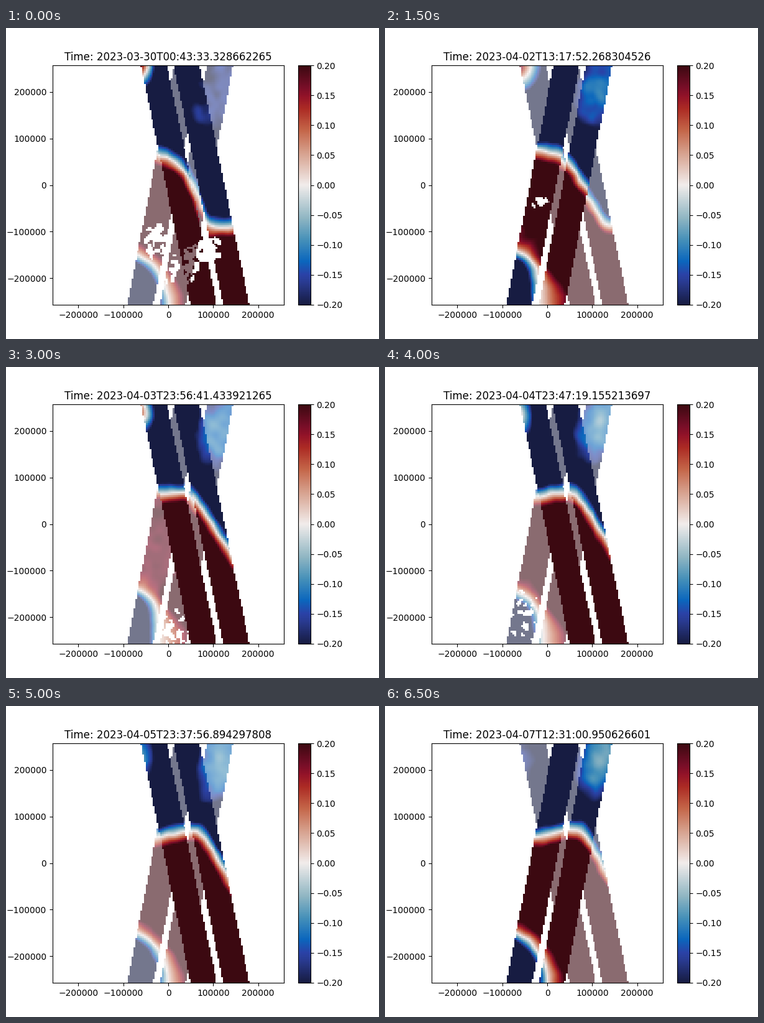
Write a matplotlib script that moves like this. It is 600 px wide and 500 px high and loops after 7000 ms.

```python
import numpy as np
import matplotlib.pyplot as plt
from matplotlib.animation import FuncAnimation
from matplotlib.colors import LinearSegmentedColormap

N = 129          # grid cells per side, about 4 km each
HALF = 257000
LIMIT = 0.2
FRAMES = 14

TIMES = [
    "2023-03-30T00:43:33.328662265", "2023-04-01T13:27:14.531207113",
    "2023-04-02T00:15:25.922013697", "2023-04-02T13:17:52.268304526",
    "2023-04-03T00:06:03.705673898", "2023-04-03T13:08:30.004416283",
    "2023-04-03T23:56:41.433921265", "2023-04-04T12:59:07.741052490",
    "2023-04-04T23:47:19.155213697", "2023-04-05T12:49:45.476731808",
    "2023-04-05T23:37:56.894297808", "2023-04-06T12:40:23.213507675",
    "2023-04-06T23:28:34.632810416", "2023-04-07T12:31:00.950626601",
]

STOPS = {
    0: "#171c42", .09: "#293a8f", .125: "#2a42a7", .18: "#0b66bd",
    .27: "#4590b9", .36: "#8eb5c2", .5: "#f1eceb", .64: "#d59d89",
    .73: "#c46548", .82: "#ac2b24", .87: "#941328", .91: "#780e28",
    1: "#3c0911",
}
cmap = LinearSegmentedColormap.from_list("diverging", list(STOPS.items()))

# Cell centres in stage pixels
cell = (np.arange(N) + .5) / N
X, Y = np.meshgrid(75 + 372 * cell, 60 + 385 * cell)

# Missing data per pass: centre, radii, density
GAPS = {
    -1: [(242, 340, 24, 34, 2.4), (266, 385, 13, 40, 1.6)],
    0: [(325, 358, 28, 26, 3), (298, 378, 15, 36, 2.6)],
    3: [(250, 282, 16, 10, 1.6)],
    4: [(352, 425, 14, 24, 1.2)],
    5: [(270, 420, 24, 32, 1.6)],
    7: [(225, 405, 26, 50, .7)],
}


def bump(t, centre, width):
    return np.exp(-((t - centre) / width) ** 2)


def softplus(x, s):
    return s * np.logaddexp(0, x / s)


def noise(seed, sigma):
    """Smooth random field with unit spread."""
    f = np.fft.fftfreq(N)
    blur = np.exp(-2 * (np.pi * sigma) ** 2 * (f ** 2 + f[:, None] ** 2))
    white = np.random.default_rng(seed).normal(size=(N, N))
    field = np.fft.ifft2(np.fft.fft2(white) * blur).real
    return field / field.std()


def ramp(d, below, above):
    return LIMIT * np.where(d < 0, d / below, d / above)


def swath(asc):
    """Two parallel strips with a narrow gap between them."""
    start, lean = (271, -76) if asc else (217, 80)
    u = X - start - lean * (Y - 60) / 385
    return ((u >= 0) & (u < 42)) | ((u >= 52.5) & (u < 94.5))


def main_front(t):
    """Gentle crest in the west that bends down past a knee drifting east."""
    dip = bump(t, 4.4, 1.6)
    level = 205 + 9 * bump(t, 0, 2) - 11 * dip
    tilt = .62 * bump(t, 0, 4) - .22
    knee = 286 + 2.4 * t - 13 * dip
    steep = 1.38 + 1.2 * bump(t, 0, 1.4) + .03 * t
    x = X[0]
    line = level + tilt * (x - 270) + (steep - tilt) * softplus(x - knee, 6)
    line = 318 - softplus(318 - line, 6) if False else line - softplus(line - 318, 6)
    slope = np.gradient(line, x)
    return (Y - line) / (1 + slope ** 2) ** .25


def low_front(t):
    """Curve bending from the west edge to the south; returns distance, width."""
    bulge = bump(t, 4.5, 3)
    x0, x1, tau = 198 + 20 * bulge, 264 - 20 * bulge, 25 - 13 * bulge
    y = Y[:, :1]
    decay = np.exp(np.minimum((360 - y) / tau, 3))
    slope = (x1 - x0) / tau * decay
    d = (X - x1 + (x1 - x0) * decay) / np.sqrt(1 + slope ** 2)
    wide = 14 + (12 + 30 * bulge) * np.clip((Y - 380) / 50, 0, 1)
    return d, wide


def north_east(t):
    cy = 104 - 1.5 * t
    peak = -.11 + .003 * t - .06 * bump(t, -.5, 1.4)
    r2 = ((X + .2 * (Y - cy) - 347) / 42) ** 2 + ((Y - cy) / 66) ** 2
    return peak - (peak + LIMIT) * r2


def north_west(t):
    peak = .24 - .0026 * t ** 2
    r = np.hypot((X - 214) / (24 + 18 * bump(t, 3, 2)), (Y - 58 - 2.5 * t) / 40)
    return peak - (peak + LIMIT) * r


def make_pass(k):
    asc = k % 2 == 1
    rough = noise(50 + k, 2)
    v = ramp(main_front(k) + rough, 16, 17)
    v = np.where(Y < 190, np.maximum(v, north_east(k) + .01 * rough), v)
    if asc:
        d, wide = low_front(k)
        v = np.minimum(v, ramp(d + .6 * rough, 15, wide))
    else:
        nw = north_west(k) + .006 * rough
        v = np.where((X < 262) & (Y < 150), np.maximum(v, nw), v)

    hidden = ~swath(asc)
    grain = noise(200 + k, .8)
    for gx, gy, rx, ry, dense in GAPS.get(k, []):
        r2 = ((X - gx) / rx) ** 2 + ((Y - gy) / ry) ** 2
        hidden |= (r2 < 1) & (grain + dense * (1 - r2) > 1.4)
    return np.ma.array(v, mask=hidden)


passes = {k: make_pass(k) for k in range(-1, FRAMES)}

fig, ax = plt.subplots(figsize=(6, 5), dpi=100)
style = dict(cmap=cmap, vmin=-LIMIT, vmax=LIMIT, aspect="auto",
             interpolation="nearest", extent=(-HALF, HALF, -HALF, HALF))
older = ax.imshow(passes[-1], alpha=.6, zorder=1, **style)
newer = ax.imshow(passes[0], zorder=2, **style)
fig.colorbar(newer, ax=ax)
title = ax.set_title("")


def draw(i):
    older.set_data(passes[i - 1])
    newer.set_data(passes[i])
    title.set_text("Time: " + TIMES[i])
    return older, newer, title


anim = FuncAnimation(fig, draw, frames=FRAMES, interval=500,
                     init_func=lambda: draw(0), repeat=True, blit=False)
plt.show()
```
